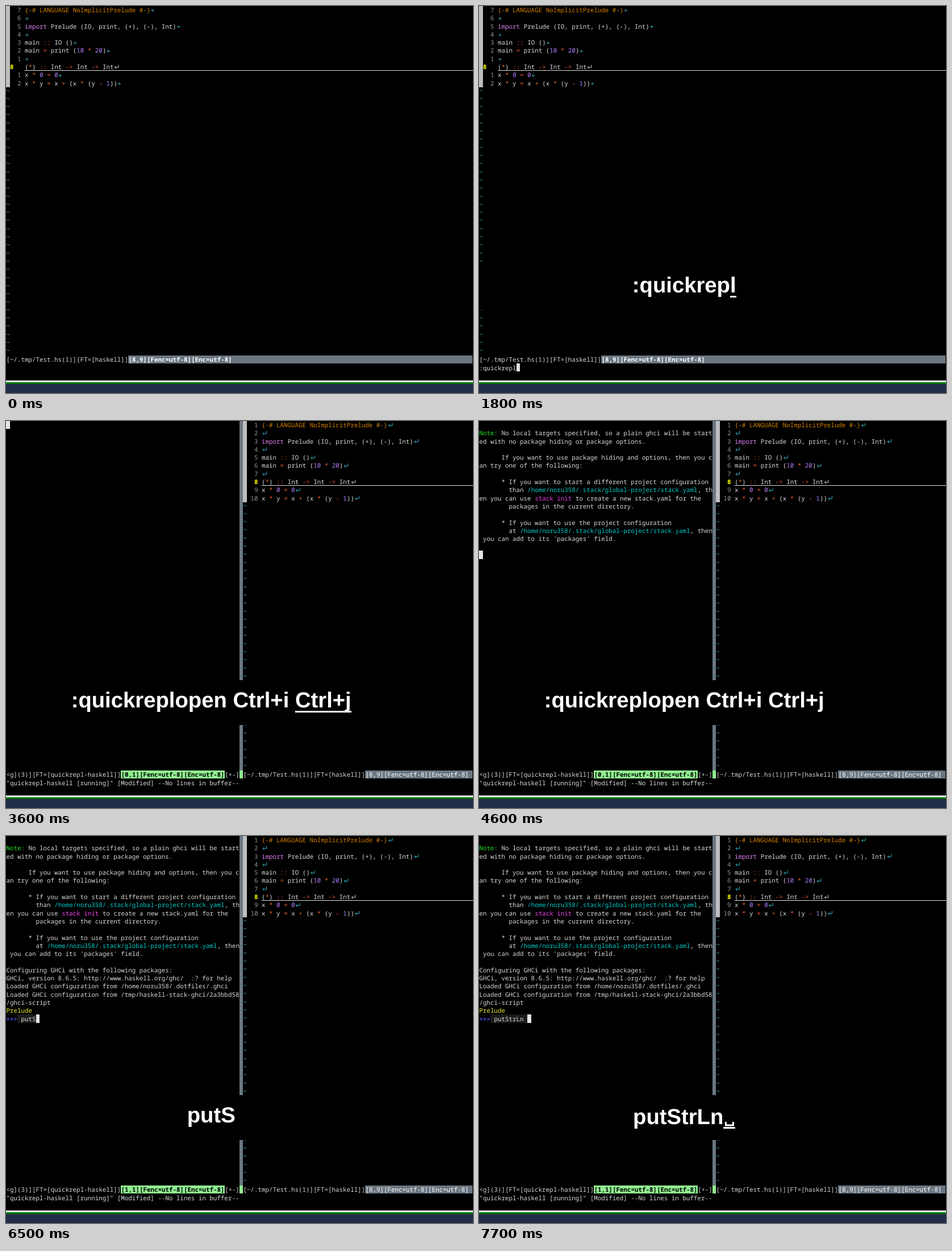
Recreate the animation shown at these times as an HTML page. Size 822 by 681 pixels, loop 8000 ms.

```html
<!DOCTYPE html>
<html lang="en">
<head>
<meta charset="utf-8">
<title>Editor session</title>
<style>
  html, body { margin: 0; width: 100%; height: 100%; overflow: hidden; background: #000; }
  svg { display: block; width: 100%; height: 100%; }
  text { white-space: pre; text-rendering: geometricPrecision; font-kerning: none; font-variant-ligatures: none; }
  .mono { font: 10.858px "Noto Sans Mono", "DejaVu Sans Mono", monospace; }
  .keys { font: bold 38.25px "Liberation Sans", Arial, sans-serif; fill: #fff; }
  rect { shape-rendering: crispEdges; }
</style>
</head>
<body>
<svg id="stage" viewBox="0 0 822 681"></svg>
<script>
const LOOP = 8000, W = 6.515, H = 14.31, BASE = 11.5, MID = 361.2;
const SLATE = '#6a7782', GREEN = '#90ee90';
const INK = {
  w: '#dadada', o: '#d78000', m: '#e080f5', r: '#f0602f', p: '#b57fff', t: '#35b4c6',
  n: '#949494', y: '#ffff00', g: '#22e022', c: '#00cdcd', v: '#f040f0', l: '#f0f030',
  b: '#4c55ff', k: '#000', h: '#fff'
};

const CODE = [
  '^o{-# LANGUAGE NoImplicitPrelude #-}',
  '',
  '^mimport^w Prelude (IO, print, (+), (-), Int)',
  '',
  'main ^r::^w IO ()',
  'main ^r=^w print (^p10^w ^r*^w ^p20^w)',
  '',
  '(^r*^w) ^r::^w Int ^r->^w Int ^r->^w Int',
  'x ^r*^w ^p0^w ^r=^w ^p0',
  'x ^r*^w y ^r=^w x ^r+^w (x ^r*^w (y ^r-^w ^p1^w))'
];
const CURRENT = 7;

const YAML = '^c/home/noru358/.stack/global-project/stack.yaml^w';
// Terminal output: [time, first row, lines]
const OUTPUT = [
  [4600, 1, [
    '^gNote:^w No local targets specified, so a plain ghci will be start',
    'ed with no package hiding or package options.',
    '',
    '      If you want to use package hiding and options, then you c',
    'an try one of the following:',
    '',
    '      * If you want to start a different project configuration',
    `        than ${YAML}, th`,
    'en you can use ^vstack init^w to create a new stack.yaml for the',
    '        packages in the current directory.',
    '',
    '      * If you want to use the project configuration',
    `        at ${YAML}, then`,
    " you can add to its 'packages' field."
  ]],
  [4800, 16, ['Configuring GHCi with the following packages:']],
  [5100, 17, [
    'GHCi, version 8.6.5: http://www.haskell.org/ghc/  :? for help',
    'Loaded GHCi configuration from /home/noru358/.dotfiles/.ghci'
  ]],
  [5200, 19, [
    'Loaded GHCi configuration from /tmp/haskell-stack-ghci/2a3bbd58',
    '/ghci-script',
    '^lPrelude'
  ]]
];

// Key display: [time, settled keys, underlined keys]
const KEYS = [
  [0, '', ''], [200, '', ':'], [400, ':', ''],
  [600, ':', 'q'], [700, ':q', 'u'], [800, ':qu', 'i'], [900, ':qui', 'c'],
  [1100, ':quic', 'k'], [1300, ':quick', 'r'], [1400, ':quickr', 'e'], [1500, ':quickre', 'p'],
  [1700, ':quickrep', ''], [1800, ':quickrep', 'l'], [2000, ':quickrepl', 'o'],
  [2200, ':quickreplo', ''], [2300, ':quickreplo', 'p'], [2400, ':quickreplop', 'e'],
  [2900, ':quickreplopen ', 'Ctrl+i'],
  [3600, ':quickreplopen Ctrl+i ', 'Ctrl+j'], [3800, ':quickreplopen Ctrl+i Ctrl+j', ''],
  [5900, '', ''], [6100, 'pu', 't'], [6300, 'put', 'S'], [6500, 'putS', ''],
  [6700, 'putS', 't'], [6900, 'putSt', 'r'], [7100, 'putStr', ''],
  [7300, 'putStr', 'L'], [7500, 'putStrL', 'n'], [7700, 'putStrLn', '␣']
];

function el(parent, tag, attrs = {}, text = '') {
  const node = document.createElementNS('http://www.w3.org/2000/svg', tag);
  set(node, attrs);
  if (text) node.textContent = text;
  parent.append(node);
  return node;
}
function set(node, attrs) {
  for (const k in attrs) node.setAttribute(k, attrs[k]);
}
const show = (node, on) => { node.style.display = on ? '' : 'none'; };
const group = parent => el(parent, 'g');
const rect = (g, x, y, width, height, fill) => el(g, 'rect', { x, y, width, height, fill });

// Grid cell to pixels; blocks snap to whole pixels, text does not.
const colX = col => col * W + 0.5;
const rowY = row => row * H - 0.6;
const snapX = col => col ? Math.round(colX(col)) : 0;
const snapY = row => row ? Math.round(rowY(row)) : 0;
const block = (row, col, n) => ({
  x: snapX(col), y: snapY(row),
  width: snapX(col + n) - snapX(col), height: snapY(row + 1) - snapY(row)
});
const cells = (g, row, col, n, fill) => el(g, 'rect', { ...block(row, col, n), fill });

// Prints a line where ^x switches to ink x; returns the column after it.
function print(g, row, col, src, weight = 400) {
  ('w' + src).replace(/^w\^/, '').split('^').forEach(part => {
    const s = part.slice(1);
    if (s) el(g, 'text', {
      class: 'mono', x: colX(col), y: rowY(row) + BASE, fill: INK[part[0]]
    }, s).style.fontWeight = weight;
    col += s.length;
  });
  return col;
}

function returnMark(g, row, col, full, color) {
  el(g, 'path', {
    d: full ? 'M8.5 4V8.5H2M4.5 6L2 8.5L4.5 11' : 'M6.5 8.5H2M4.3 6.2L2 8.5L4.3 10.8',
    transform: `translate(${colX(col)} ${rowY(row)})`,
    fill: 'none', stroke: color, 'stroke-width': 1
  });
}

function codeWindow(g, col, relative) {
  rect(g, snapX(col), 0, snapX(col + 1) - snapX(col), snapY(CODE.length), '#bebebe');
  CODE.forEach((src, i) => {
    const here = i === CURRENT;
    const num = String(relative && !here ? Math.abs(i - CURRENT) : i + 1);
    const at = here && relative ? col + 1 : col + 4 - num.length;
    print(g, i, at, (here ? '^y' : '^n') + num, here ? 700 : 400);
    const end = print(g, i, col + 5, src);
    returnMark(g, i, end, here || !relative, here ? INK.w : INK.t);
  });
  rect(g, snapX(col + 5), 113, 822 - snapX(col + 5), 1, '#dcdcdc');
  for (let row = CODE.length; row < 43; row++)
    el(g, 'text', { class: 'mono', x: colX(col), y: rowY(row) + BASE - 1.5, fill: '#46b0c0' }, '~');
  print(g, 43, col, '[~/.tmp/Test.hs(1)][FT=[haskell]]');
  cells(g, 43, col + 33, 126 - col - 33, SLATE);
  print(g, 43, col + 33, '^h[8,9][Fenc=utf-8][Enc=utf-8]', relative ? 700 : 400);
}

const stage = document.getElementById('stage');
rect(stage, 0, 0, 822, 681, '#000');

const solo = group(stage);
codeWindow(solo, 0, true);

const split = group(stage);
codeWindow(split, 64, false);
rect(split, snapX(63), 0, snapX(64) - snapX(63), snapY(43), SLATE);
print(split, 43, 0, '<g](3)][FT=[quickrepl-haskell]]');
cells(split, 43, 31, 28, GREEN);
const pos = [0, 1].map(n => {
  const g = group(split);
  print(g, 43, 31, `^k[${n},1][Fenc=utf-8][Enc=utf-8]`, 700);
  return g;
});
print(split, 43, 59, '[+-]');
cells(split, 43, 63, 1, GREEN);
print(split, 44, 0, '"quickrepl-haskell [running]" [Modified] --No lines in buffer--');

const chunks = OUTPUT.map(([time, first, lines]) => {
  const g = group(split);
  lines.forEach((s, i) => print(g, first + i, 0, s));
  return { time, g };
});
const prompt = group(split);
print(prompt, 22, 0, '^b>>>', 700);

const shade = cells(stage, 22, 3, 1, '#1b1b1b');
const input = el(stage, 'text', { class: 'mono', fill: INK.w });
const cursor = cells(stage, 0, 0, 1, '#e4e4e4');
const under = group(stage);
print(under, CURRENT, 13, '^kn');

rect(stage, 0, 659, 822, 3, '#fff');
rect(stage, 0, 662, 822, 3, '#007d0c');
rect(stage, 0, 665, 822, 16, '#222e49');

const keys = group(stage);
rect(keys, 0, 456, 822, 79, '#000');
const label = el(keys, 'text', { class: 'keys', 'text-anchor': 'middle' });
const settled = el(label, 'tspan'), recent = el(label, 'tspan');
const line = rect(keys, 0, 510, 0, 3, '#fff');
const blank = el(keys, 'path', { fill: 'none', stroke: '#fff', 'stroke-width': 3 });
const BLANK_W = 21;

function drawKeys(done, lit) {
  show(keys, done + lit);
  if (!(done + lit)) return;
  const space = lit === '␣';
  settled.textContent = done;
  recent.textContent = space ? '' : lit;
  set(label, { x: space ? MID - BLANK_W / 2 : MID, y: space ? 507 : 504 });
  const total = label.getComputedTextLength() + (space ? BLANK_W : 0);
  const width = space ? BLANK_W : lit ? recent.getComputedTextLength() : 0;
  const x = MID + total / 2 - width;
  set(line, { x, width, y: space ? 512 : 510 });
  show(blank, space);
  if (space) set(blank, { d: `M${x + 4} 503V509H${x + 17}V503` });
}

// Cursor cell and typed text: [row, column, text, text column]
function typing(t, typed) {
  if (t < 200) return null;
  if (t < 600) return [CURRENT, 13, '', 0];
  if (t < 3600) {
    const cmd = t < 2900 ? typed : ':QuickReplOpen';
    return [44, cmd.length, cmd, 0];
  }
  if (t < 4600) return [0, 0, '', 0];
  if (t < 4800) return [16, 0, '', 0];
  if (t < 5100) return [17, 0, '', 0];
  if (t < 5200) return [19, 0, '', 0];
  const s = t < 6100 ? '' : typed.replace('␣', ' ');
  return [22, 4 + s.length, s, 4];
}

function draw(t) {
  const [, done, lit] = KEYS.filter(k => k[0] <= t).pop();
  const two = t >= 3600;
  show(solo, !two);
  show(split, two);
  show(pos[0], t < 4800);
  show(pos[1], t >= 4800);
  chunks.forEach(c => show(c.g, t >= c.time));
  show(prompt, t >= 5200);
  show(shade, t >= 5200);

  const at = typing(t, done + lit);
  show(cursor, at);
  show(input, at);
  show(under, t >= 200 && t < 600);
  if (at) {
    const [row, col, text, from] = at;
    set(cursor, block(row, col, 1));
    set(input, { x: colX(from), y: rowY(row) + BASE });
    input.textContent = text;
    set(shade, block(22, 3, Math.max(1, col - 3)));
  }
  drawKeys(done, lit);
}

const marks = [...new Set([...KEYS, ...OUTPUT].map(s => s[0]))].sort((a, b) => a - b);
let last = -1;
function tick() {
  const t = performance.now() % LOOP;
  const mark = marks.filter(m => m <= t).pop();
  if (mark !== last) draw(last = mark);
  requestAnimationFrame(tick);
}
tick();
</script>
</body>
</html>
```
